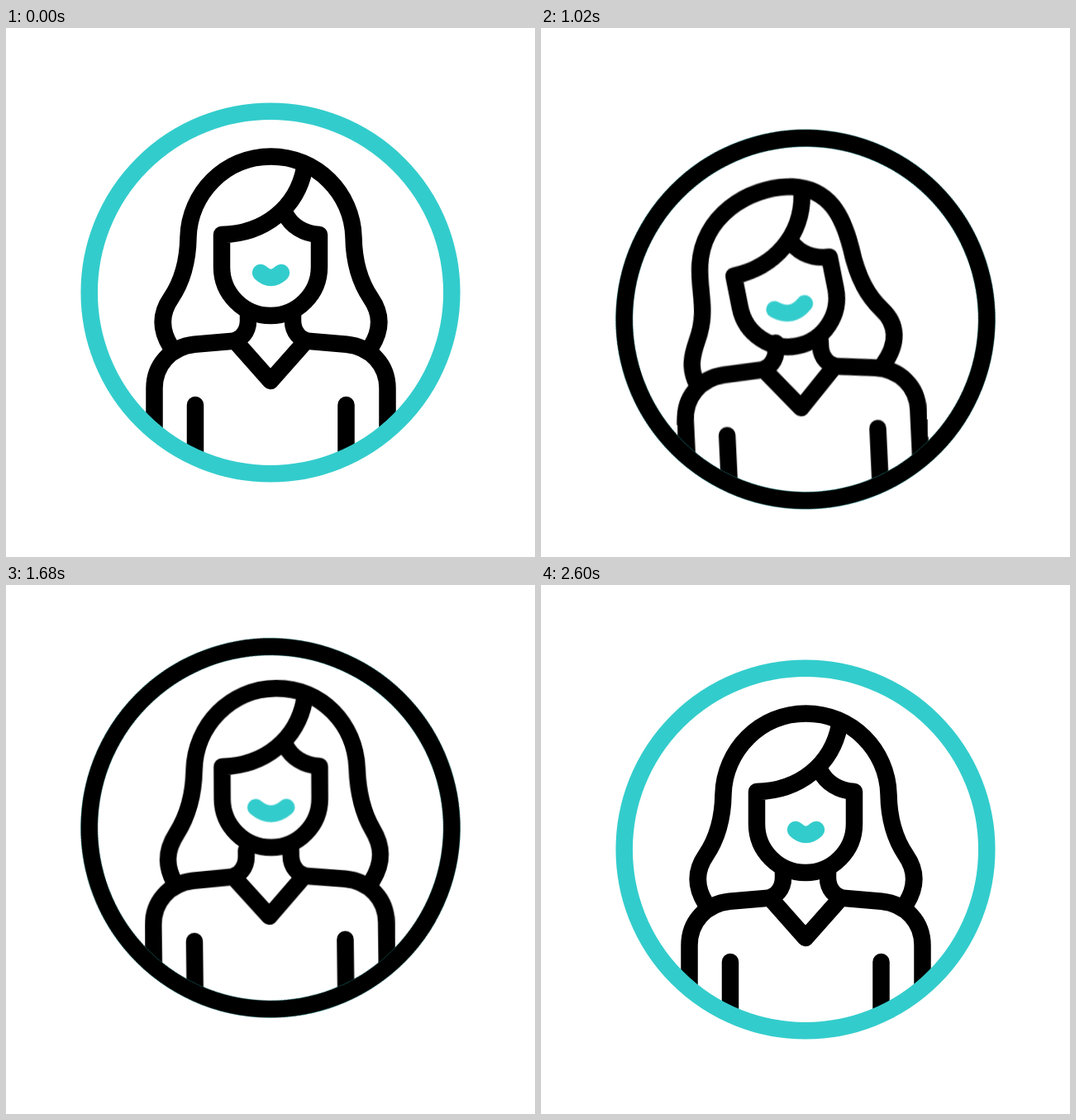
An HTML page that plays this animation: 640 px wide and 640 px high, repeating every 3 s.

```html
<!DOCTYPE html>
<html lang="en">
<head>
<meta charset="utf-8">
<title>Woman avatar</title>
<style>
  html, body { margin: 0; width: 100%; height: 100%; overflow: hidden; background: #fff; }
  svg { display: block; width: 100%; height: 100%; }

  path, circle { fill: none; stroke: #000; stroke-width: 20.5; stroke-linecap: round; stroke-linejoin: round; }
  .teal { stroke: #33cccc; }

  .bob, .lean, .tilt, .hair, .arc, .mouth {
    animation: 3s cubic-bezier(.33, 0, .67, 1) infinite;
  }
  .bob { animation-name: bob; animation-timing-function: cubic-bezier(.3, 0, .7, 1); }
  .lean { animation-name: lean; transform-origin: 320px 539px; }
  .tilt { animation-name: tilt; transform-origin: 320px 249.5px; }
  .hair { animation-name: hair; }
  .mouth { animation-name: smile; }
  .arc { animation-name: arc, show; animation-timing-function: cubic-bezier(.33, 0, .67, 1), step-end; }

  @keyframes bob {
    0%, 6.667%, 86.667%, 100% { transform: translateY(0); }
    30.167% { transform: translateY(35.5px); }
    63.233% { transform: translateY(-35.5px); }
  }

  @keyframes lean {
    0%, 6.667%, 86.667%, 100% { transform: rotate(0deg); }
    25% { transform: rotate(-8.75deg); }
    46.667% { transform: rotate(7.25deg); }
    63.333% { transform: rotate(-6.2deg); }
  }

  /* Head and hair share the same beats: rest, tilted, upright, tilted, rest. */
  @keyframes tilt {
    0%, 6.667%, 86.667%, 100% { transform: translate(0, 0) rotate(0deg); }
    29%, 31.333%, 68.667% { transform: translate(-17.2px, 5.7px) rotate(-9.3deg); }
    47.333%, 54.667% { transform: translate(4.7px, -4.6px) rotate(.7deg); }
  }

  @keyframes hair {
    0%, 6.667%, 86.667%, 100% {
      d: path("M320.5 155.5 C265 155.5 222 200 220.5 253 C220 285 211 310 199.5 327 C187 345 186 364 199 385 M320.5 155.5 C376 155.5 419 200 420.5 253 C421 285 430 310 441.5 327 C454 345 455 364 442 385");
    }
    29%, 31.333%, 68.667% {
      d: path("M321.3 160 C266.3 156.6 209.6 191 203.7 248.7 C200.3 282.6 212.3 303 197.4 340.6 C190.5 359 186 373.6 195 393.6 M321.3 160 C366 164.7 377.6 199 386 235 C393 274 405 295.3 421.4 312 C440.6 331 439.2 355 419.7 379");
    }
    47.333%, 54.667% {
      d: path("M332 151 C276.5 151 234 195 232 249 C231 282 222 306 209.5 325 C196 345 195 364 206 384 M332 151 C387.5 151 428 196 429.5 249 C430 283 437 306 447 324 C459 345 459 364 446 385");
    }
  }

  @keyframes smile {
    0%, 6.667%, 86.667%, 100% { d: path("M308 296 Q320.5 308 333 296"); }
    26.667%, 66.667% { d: path("M301.5 299.5 Q320 315 338.5 299.5"); }
  }

  @keyframes arc {
    0%, 6.667%, 86.667%, 100% { stroke-dasharray: 0 360; stroke-dashoffset: 0; }
    33.333%, 60% { stroke-dasharray: 360 0; stroke-dashoffset: 180; }
  }

  @keyframes show {
    0%, 86.667%, 100% { opacity: 0; }
    6.7% { opacity: 1; }
  }
</style>
</head>
<body>
<svg viewBox="0 0 640 640">
  <clipPath id="disc"><circle cx="320" cy="320" r="220"/></clipPath>
  <g class="bob">
    <g clip-path="url(#disc)">
      <g class="lean">
        <path d="M179.5 610 V436 C179.5 408 199 386 228 382.8 L272 379 C284 378 293 368 293 354 V347"/>
        <path d="M461.5 610 V436 C461.5 408 442 386 412 382.8 L368 379 C356 378 347 368 347 354 V347"/>
        <path d="M281 383 L320 427 L359 383"/>
        <path d="M229 456 V610 M411.5 456 V610"/>
        <path class="hair"/>
        <g class="tilt">
          <path d="M361 170 C352 217 313 249 261 250 V289 A59 59 0 0 0 379 289 V250 C360 249 345 239 338 225"/>
          <path class="mouth teal"/>
        </g>
      </g>
    </g>
    <circle class="teal" cx="320" cy="320" r="219.3"/>
    <circle class="arc" cx="320" cy="320" r="219.3" pathLength="360" transform="rotate(162 320 320)"/>
  </g>
</svg>
</body>
</html>
```
